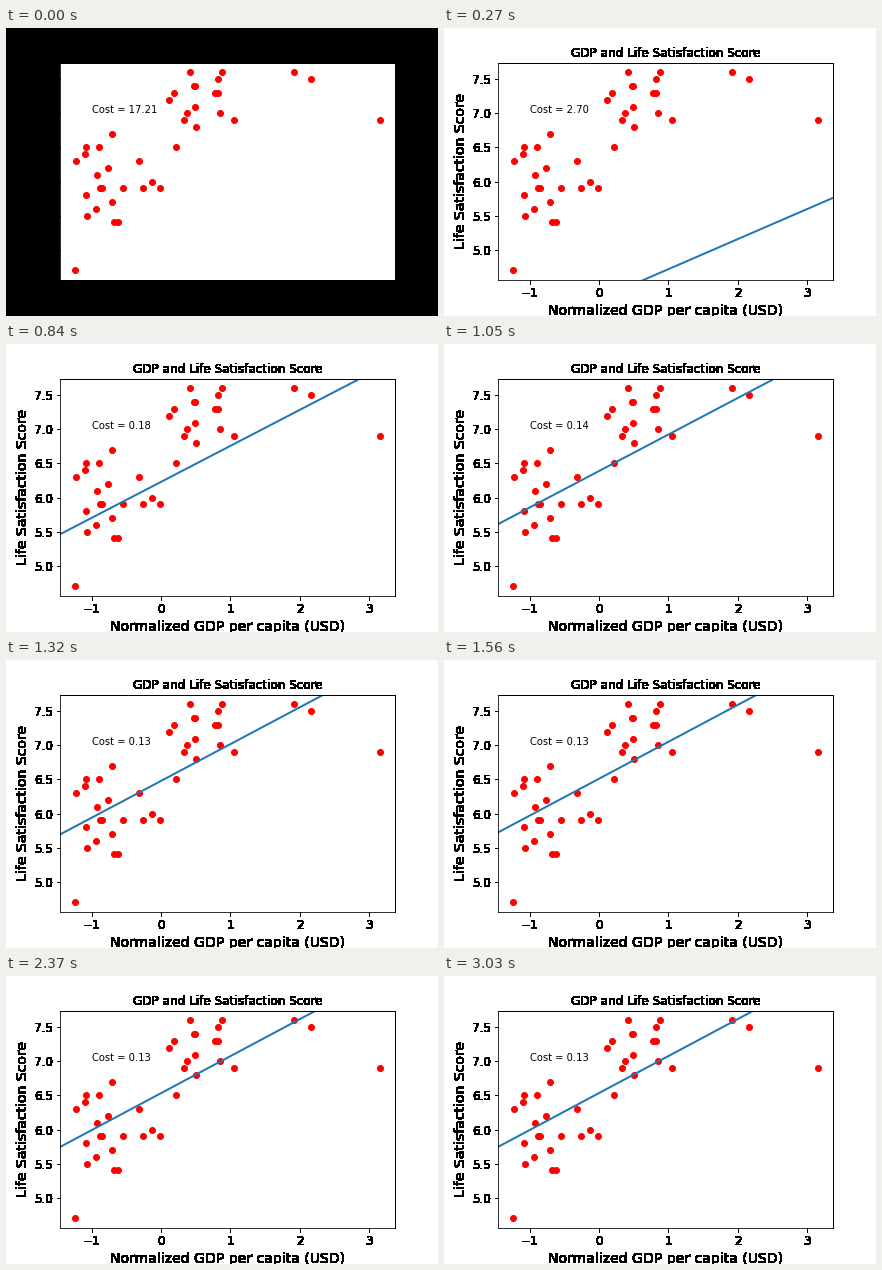
A matplotlib script for the animation above (9000 ms loop, 432 px wide and 288 px high).

```python
import matplotlib.pyplot as plt
import numpy as np
from matplotlib.animation import FuncAnimation
from matplotlib.patches import Rectangle

FRAMES, INTERVAL = 300, 30
RATE = 0.1

# Income (arbitrary units, normalised below) and satisfaction per country
income = np.array([
    69, 70, 80, 79, 80, 81, 90, 91, 93, 94, 96, 102, 106, 106, 108, 112,
    117, 133, 137, 146, 154, 163, 168, 170, 178, 181, 184, 188, 189, 189,
    190, 209, 212, 212, 214, 216, 228, 288, 306, 374.3])
score = np.array([
    4.7, 6.3, 6.5, 6.4, 5.8, 5.5, 5.6, 6.1, 6.5, 5.9, 5.9, 6.2, 6.7, 5.7,
    5.4, 5.4, 5.9, 6.3, 5.9, 6.0, 5.9, 7.2, 7.3, 6.5, 6.9, 7.0, 7.6, 7.4,
    7.4, 7.1, 6.8, 7.3, 7.3, 7.5, 7.0, 7.6, 6.9, 7.6, 7.5, 6.9])
x = (income - income.mean()) / income.std(ddof=1)


def descend(steps):
    """Parameters and cost of a linear fit at every gradient step."""
    theta = np.random.RandomState(123).rand(2)
    design = np.column_stack([np.ones_like(x), x])
    history = []
    for _ in range(steps):
        error = design @ theta - score
        history.append((*theta, (error ** 2).mean() / 2))
        theta = theta - RATE * design.T @ error / len(x)
    return history


def solid(img, dpi):
    """Make every touched pixel opaque, for heavy, hard-edged lettering."""
    out = np.zeros_like(img)
    out[..., 3] = img[..., 3] > 0
    return out, 0, 0


history = descend(FRAMES)

fig, ax = plt.subplots(figsize=(6, 4), dpi=72)
fig.subplots_adjust(left=0.125, right=0.9, bottom=0.125, top=0.88)
backdrop = fig.add_artist(Rectangle(
    (0, 0), 1, 1, transform=fig.transFigure, lw=0, fc="black", zorder=-1))

ax.plot(x, score, "ro")
ax.set_xlim(ax.get_xlim())
ax.set_ylim(ax.get_ylim())
ax.set_xticks(range(-1, 4))
ax.set_yticks(np.arange(5, 7.6, 0.5))
ax.tick_params(labelsize=12)
ax.set_title("GDP and Life Satisfaction Score", fontsize=12)
ax.set_xlabel("Normalized GDP per capita (USD)", fontsize=14)
ax.set_ylabel("Life Satisfaction Score", fontsize=14)

hard = [ax.title, ax.xaxis.label, ax.yaxis.label,
        ax.spines["top"], ax.spines["right"]]
for axis in (ax.xaxis, ax.yaxis):
    for tick in axis.get_major_ticks():
        hard += [tick.label1, tick.tick1line]
for artist in hard:
    artist.set_agg_filter(solid)

ends = np.array([-5, 5])
line, = ax.plot(ends, ends, color="C0", lw=2)
label = ax.text(-1, 7, "", fontsize=10)


def update(i):
    bias, slope, cost = history[i]
    backdrop.set_facecolor("white" if i else "black")
    line.set_ydata(bias + slope * ends)
    label.set_text(f"Cost = {cost:.2f}")
    return backdrop, line, label


anim = FuncAnimation(fig, update, frames=FRAMES, interval=INTERVAL,
                     init_func=lambda: update(0), repeat=True, repeat_delay=0)
plt.show()
```
